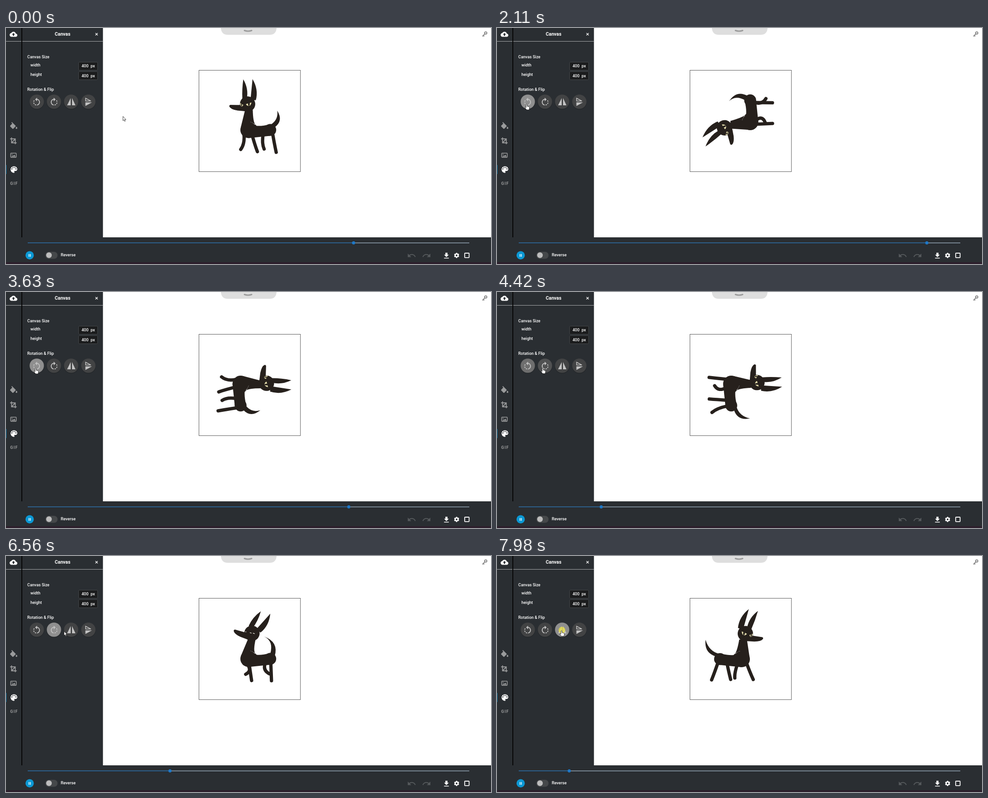
These frames come from a looping animation (1072x522 px, 8000 ms). An HTML page:

```html
<!DOCTYPE html>
<html lang="en">
<head>
<meta charset="utf-8">
<title>Canvas</title>
<style>
html, body { margin: 0; width: 100%; height: 100%; overflow: hidden; background: #fff; }
svg { display: block; width: 100%; height: 100%; }
text { font: 500 9px Roboto, Arial, sans-serif; fill: #fff; }
.title { font-weight: 700; font-size: 10.5px; }
.dim { fill: #9a9b9c; }
.off { fill: #55595c; }
.ico { fill: #c2c2c2; }
</style>
</head>
<body>
<svg viewBox="0 0 1072 522">
  <defs>
    <path id="turn" d="M7.11 8.53L5.7 7.11C4.8 8.27 4.24 9.61 4.07 11h2.02c.14-.87.49-1.72 1.02-2.47zM6.09 13H4.07c.17 1.39.72 2.73 1.62 3.89l1.41-1.42c-.52-.75-.87-1.59-1.01-2.47zm1.01 5.32c1.16.9 2.51 1.44 3.9 1.61V17.9c-.87-.15-1.71-.49-2.46-1.03L7.1 18.32zM13 4.07V1L8.45 5.55 13 10V6.09c2.84.48 5 2.94 5 5.91s-2.16 5.43-5 5.91v2.02c3.95-.49 7-3.85 7-7.93s-3.05-7.44-7-7.93z"/>
    <path id="undo" d="M12.5 8c-2.65 0-5.05.99-6.9 2.6L2 7v9h9l-3.62-3.62c1.39-1.16 3.16-1.88 5.12-1.88 3.54 0 6.55 2.31 7.6 5.5l2.37-.78C21.08 11.03 17.15 8 12.5 8z"/>
    <g id="eye">
      <path d="M-6 0L6-4Q5 4-1 4-5 3-6 0z" fill="#e6dfae"/>
      <ellipse cx=".5" rx="2" ry="3.6" fill="#26201c"/>
    </g>
  </defs>

  <rect width="1072" height="522" fill="#fff"/>
  <path d="M475 0H598Q597 15 583 15H490Q476 15 475 0z" fill="#dedede"/>
  <path d="M527 5.5Q535 8.5 543 5.5" fill="none" stroke="#9c9c9c" stroke-width="3" stroke-linecap="round"/>
  <g fill="none" stroke="#8c8c8c" stroke-width="2.2">
    <circle cx="1060.3" cy="11" r="2.5"/><path d="M1058.5 13L1053 18.5M1055 16.5l2 2"/>
  </g>

  <rect x="426.5" y="93.5" width="224.3" height="224.2" fill="#fff" stroke="#585858"/>
  <g id="dog" fill="#26201c">
    <g id="legs" fill="none" stroke="#26201c" stroke-width="7.3" stroke-linecap="round">
      <path/><path/><path/><path/>
    </g>
    <path id="shape"/>
    <circle id="chest" cx="536" r="18"/>
    <circle id="hip" cx="584" r="13.2"/>
    <g id="head">
      <circle r="17"/>
      <path d="M-13 2.5L-38 3.2Q-41 4-40 7-37 13-22 15L-5 16z"/>
      <g id="eyes"><use href="#eye" x="2.5"/><use href="#eye" transform="translate(-13 2) scale(-.6 1)"/></g>
      <path id="lids" d="M-5 0h4M2-1h4M-15 1h2" stroke="#f4f2e6" stroke-width="1.3"/>
    </g>
  </g>

  <path d="M0 0H214.3V463H1072V522H0z" fill="#2a2e32"/>
  <rect y="518" width="1072" height="4" fill="#2d1f2c"/>
  <rect x="34" width="2" height="463" fill="#050505"/>
  <path d="M0 29.5H34M36 29.5H214" stroke="#a9abad"/>

  <text class="title" x="125" y="16.8" text-anchor="middle">Canvas</text>
  <path d="M197.6 11.1l5.2 5.2m0-5.2l-5.2 5.2" stroke="#fff" stroke-width="1.3"/>
  <text x="47" y="67">Canvas Size</text>
  <text x="54" y="85.2">width</text>
  <text x="54" y="106">height</text>
  <g fill="#1b1c1d" stroke="#45484a">
    <rect x="160.5" y="75.5" width="42" height="18" rx="2"/>
    <rect x="160.5" y="96.5" width="42" height="18" rx="2"/>
  </g>
  <text x="167" y="87.4">400</text><text x="187" y="87.4">px</text>
  <text x="167" y="108.6">400</text><text x="187" y="108.6">px</text>
  <text x="47" y="138.8">Rotation &amp; Flip</text>

  <g id="buttons"></g>
  <g class="ico">
    <use href="#turn" transform="translate(56.6 153) scale(.92)"/>
    <use href="#turn" transform="translate(117.4 153) scale(-.92 .92)"/>
    <path d="M143 155V171H135zM146 155V171H153.5z"/>
    <path d="M175.5 164.5H190L175.5 172.5z"/>
    <path d="M176 155.3V161.5H187.5z" fill="none" stroke="#c2c2c2" stroke-width="1.6"/>
  </g>

  <path fill="#fff" transform="translate(8 5.3) scale(.71)" d="M19.35 10.04C18.67 6.59 15.64 4 12 4 9.11 4 6.6 5.64 5.35 8.04 2.34 8.36 0 10.91 0 14c0 3.31 2.69 6 6 6h13c2.76 0 5-2.24 5-5 0-2.64-2.05-4.78-4.65-4.96zM14 13v4h-4v-4H7l5-5 5 5h-3z"/>
  <g class="dim">
    <path transform="translate(6.3 208) scale(.89)" d="M16.56 8.94L7.62 0 6.21 1.41l2.38 2.38-5.15 5.15c-.59.59-.59 1.54 0 2.12l5.5 5.5c.29.29.68.44 1.06.44s.77-.15 1.06-.44l5.5-5.5c.59-.58.59-1.53 0-2.12zM19 11.5s-2 2.17-2 3.5c0 1.1.9 2 2 2s2-.9 2-2c0-1.33-2-3.5-2-3.5z"/>
    <path d="M12.3 242V254H23.5M9 245.3H20.5V257M20.5 245.3L12.3 254" fill="none" stroke="#9a9b9c" stroke-width="1.9"/>
    <rect x="10.4" y="276.7" width="12.2" height="9.4" rx="1" fill="none" stroke="#9a9b9c" stroke-width="1.6"/>
    <path d="M12 284.5l2.2-3 1.6 1.8 2.4-3.2 3 4.4z"/><circle cx="13.6" cy="279.6" r="1"/>
    <text class="dim" x="9.3" y="347.3" style="font-weight:700;letter-spacing:1.2px">GIF</text>
  </g>
  <path fill="#fff" transform="translate(7.7 303.2) scale(.82)" d="M12 3c-4.970-9 4.030-9 9s4.030 9 9 9" visibility="hidden"/>
  <g fill="#fff">
    <path d="M17.4 305.7a7.4 7.4 0 1 0 0 14.8c1.300 1.500-1.300.8-2-.5-1.200.2-2 1.200-2h1.500c2.300 0 4.200-1.800 4.200-4.100 0-3.700-3.300-6.700-7.400-6.700z" visibility="hidden"/>
    <path transform="translate(7.7 303.2) scale(.82)" d="M12 3c-4.97 0-9 4.03-9 9s4.03 9 9 9c.83 0 1.5-.67 1.5-1.5 0-.39-.15-.74-.39-1.01-.23-.26-.38-.61-.38-.99 0-.83.67-1.5 1.5-1.5H16c2.76 0 5-2.24 5-5 0-4.42-4.03-8-9-8z"/>
  </g>
  <g fill="#2a2e32">
    <circle cx="13" cy="311.8" r="1.2"/><circle cx="15.5" cy="308.5" r="1.2"/>
    <circle cx="19.6" cy="308.5" r="1.2"/><circle cx="22" cy="311.8" r="1.2"/>
  </g>
  <rect y="303" width="1" height="20" fill="#1480b4"/>

  <rect x="48" y="474.8" width="976" height="1.2" fill="#a9bed0"/>
  <rect id="played" x="48" y="474.8" height="1.2" fill="#1d6db5"/>
  <circle id="knob" cy="475.3" r="3.5" fill="#1e78c8"/>
  <circle cx="52.3" cy="502.8" r="9.2" fill="#0b98d4"/>
  <path d="M50.8 500v6M53.9 500v6" stroke="#fff" stroke-width="1.5"/>
  <rect x="87" y="495" width="27" height="15.5" rx="7.7" fill="#45484a"/>
  <circle cx="95" cy="502.5" r="6.2" fill="#bdbdbd"/>
  <text x="121" y="505.3" style="font-size:9.2px">Reverse</text>
  <g class="off">
    <use href="#undo" transform="translate(886.3 493) scale(.86)"/>
    <use href="#undo" transform="translate(939.7 493) scale(-.86 .86)"/>
  </g>
  <path fill="#fff" transform="translate(964.5 494.7) scale(.75)" d="M19 9h-4V3H9v6H5l7 7 7-7zM5 18v2h14v-2H5z"/>
  <g fill="none" stroke="#fff">
    <circle cx="996" cy="503" r="3.3" stroke-width="2.8"/>
    <circle cx="996" cy="503" r="4.9" stroke-width="1.8" pathLength="12" stroke-dasharray="1 1" transform="rotate(15 996 503)"/>
    <rect x="1013.8" y="498" width="9.8" height="9.8" rx=".8" stroke-width="1.8"/>
  </g>

  <circle id="flash" r="7.5" fill="#f0e63c" opacity=".7"/>
  <g id="cursor" fill="#fff" stroke="#1a1a1a" stroke-width=".8" stroke-linejoin="round">
    <path id="arrow" d="M0 0V9.5L2.2 7.5 3.8 11 5.3 10.3 3.8 7H6.6z"/>
    <path id="hand" d="M-1.2 .3Q0-1.2 1.2 .3V4L5 5Q6.5 5.5 6.3 7.5L5.5 12H0L-3.5 7.5Q-3.6 5.8-2.2 6.3L-1.2 7.2z"/>
  </g>
</svg>
<script>
const LOOP = 8000, FRAME = 79.44, LEAD = 44;
const ROUND = 1728, BEGIN = .738, STALL = 61;   // clip length, first position, pause per click
const GAIT = 2 / 3;                             // rounds per stride
const BUTTONS = [68, 106, 144, 182];
// time, button: turn left, turn right, mirror
const CLICKS = [[1790, 0], [2560, 0], [3440, 0], [4700, 1], [5340, 1], [6060, 1], [7850, 2]];
const POINTER = [[0, 258.5, 195.5], [150, 250, 196], [550, 97, 202], [1310, 61, 187],
  [1700, 65.5, 169], [4000, 65.5, 169], [4300, 101, 168.5], [6300, 102, 168.5], [6700, 142.5, 165.5]];

const $ = id => document.getElementById(id);
const set = (el, attrs) => { for (const k in attrs) el.setAttribute(k, attrs[k]); };
const show = (el, on) => set(el, { visibility: on ? 'visible' : 'hidden' });
const clamp = x => Math.min(1, Math.max(0, x));
const mix = (a, b, k) => a + (b - a) * k;
const wave = x => Math.cos(2 * Math.PI * x);
const polar = (x, y, deg, len) => {
  const a = deg * Math.PI / 180;
  return [x + Math.sin(a) * len, y - Math.cos(a) * len];
};

$('buttons').innerHTML = BUTTONS.map(x =>
  `<circle cx="${x}" cy="164.5" r="16.3" fill="#1f2225" opacity=".4"/><circle class="b" cx="${x}" cy="163" r="15.8"/>`).join('');
const discs = document.querySelectorAll('.b');

function ear(bx, by, tx, ty, half, left, right) {
  const len = Math.hypot(tx - bx, ty - by);
  const nx = (by - ty) / len, ny = (tx - bx) / len;
  const mx = (bx + tx) / 2, my = (by + ty) / 2;
  const side = (x, y, d) => `${x + nx * d} ${y + ny * d}`;
  return `M${side(bx, by, -half)}Q${side(mx, my, left)} ${tx} ${ty}` +
    `Q${side(mx, my, right)} ${side(bx, by, half)}z`;
}

// The foot slides back on the ground, then swings forward with a bent knee.
function leg(s, y, { top, sway, lag, fore, ground, bend }) {
  s -= Math.floor(s);
  const v = clamp((s - ground) / (1 - ground)), lift = Math.sin(Math.PI * v);
  const back = s < ground ? s / ground : .75 - v / 2 - 2 * (v - .5) ** 3;
  const x0 = top - sway * wave(s - lag), x = fore + 48 * back;
  const fy = s < ground ? 273 + 3 * Math.sin(Math.PI * back) : 273 - 13 * lift;
  return `M${x0} ${y + 11}Q${(x0 + x) / 2 + bend * lift} ${258 - 5 * lift} ${x} ${fy}`;
}
const FRONT = { top: 535, sway: 10.5, lag: .03, fore: 510, ground: .465, bend: 16 };
const BACK = { top: 579, sway: 11, lag: -.03, fore: 560, ground: .57, bend: -10 };

function drawDog(p) {
  const nod = wave(p - .466), bob = wave(4 * (p - .11)), wag = wave(3 * (p - .145));
  const hx = 535.7 + 12.8 * nod, hy = 170 + 1.7 * bob, tilt = 5 + 20 * nod;
  const y = 226.7 + 1.3 * bob;
  const ear1 = polar(hx, hy, 42 * nod - 4, 55 - 4 * nod);
  const ear2 = polar(hx, hy, 42 * nod + 17, 57 + 4 * nod);
  const base1 = polar(hx, hy, tilt - 30, 14), base2 = polar(hx, hy, tilt + 53, 15);
  const bend = Math.min(3, 3 - tilt / 4);
  const nx = hx + 3.5 - .22 * tilt, ny = hy + 13;
  const tx = 595 + 25 * wag, ty = 182 + 4 * wag, cx = 612 + 9 * wag, cy = 203 + 13 * wag;
  set($('shape'), { d:
    ear(...base1, ...ear1, 5, bend - 7, bend + 8) +
    ear(...base2, ...ear2, 6, -3, 13) +
    `M${nx - 8.5} ${ny}L519 ${y - 6}L551 ${y - 12}Q546 ${y - 18} ${nx + 8.5} ${ny}z` +
    `M540 ${y - 18}Q550 ${y - 14} 554 ${y - 9}Q566 ${y - 8} 584 ${y - 12.5}V${y + 13}L536 ${y + 18}z` +
    `M594 ${y - 6}Q${cx} ${cy} ${tx} ${ty}Q${cx - 11} ${cy - 2} 584 ${y - 11}z` });
  set($('chest'), { cy: y });
  set($('hip'), { cy: y });
  set($('head'), { transform: `translate(${hx} ${hy}) rotate(${tilt})` });

  const open = clamp((.7 - nod) * 2);
  set($('eyes'), { transform: `scale(1 ${open})` });
  show($('eyes'), open > .2);
  show($('lids'), open <= .2);

  const s = (p - .11) / GAIT;
  [leg(s, y, FRONT), leg(s + .5, y, FRONT), leg(s, y, BACK), leg(s + .5, y, BACK)]
    .forEach((d, i) => set($('legs').children[i], { d }));
}

function pointer(t) {
  const i = POINTER.findIndex(k => k[0] > t);
  if (i < 0) return POINTER[POINTER.length - 1].slice(1);
  const a = POINTER[i - 1], b = POINTER[i], k = (t - a[0]) / (b[0] - a[0]);
  return [mix(a[1], b[1], k), mix(a[2], b[2], k)];
}

function draw(ms) {
  const n = Math.floor((ms + LEAD) / FRAME);
  const t = n ? n * FRAME - LEAD + 10 : 0;
  const done = CLICKS.filter(c => c[0] <= t);
  const count = b => done.filter(c => c[1] === b).length;
  const [when, pressed] = done[done.length - 1] || [-LOOP, -1];

  const waited = done.reduce((sum, c) => sum + Math.min(STALL, t - c[0]), 0);
  const p = (BEGIN + (t - waited) / ROUND) % 1, x = 48 + 976 * p;
  drawDog(p);
  set($('dog'), { transform: `translate(538.5 205.5) scale(${count(2) ? -1 : 1} 1) ` +
    `rotate(${90 * (count(1) - count(0))}) translate(-538.5 -205.5)` });
  set($('played'), { width: x - 48 });
  set($('knob'), { cx: x });

  const [px, py] = pointer(t);
  const over = BUTTONS.findIndex(bx => Math.hypot(px - bx, py - 163) < 15.8);
  discs.forEach((disc, i) => {
    const lit = over < 0 || over === i ? '#8f8f8f' : '#6e6e6e';
    set(disc, { fill: i === pressed ? lit : i === over ? '#505152' : '#424344' });
  });
  set($('cursor'), { transform: `translate(${px} ${py})` });
  show($('arrow'), over < 0);
  show($('hand'), over >= 0);
  set($('flash'), { cx: px + 1, cy: py - 1.5 });
  show($('flash'), t - when < 160);
}

const start = performance.now();
function tick() {
  draw((performance.now() - start) % LOOP);
  requestAnimationFrame(tick);
}
tick();
</script>
</body>
</html>
```
